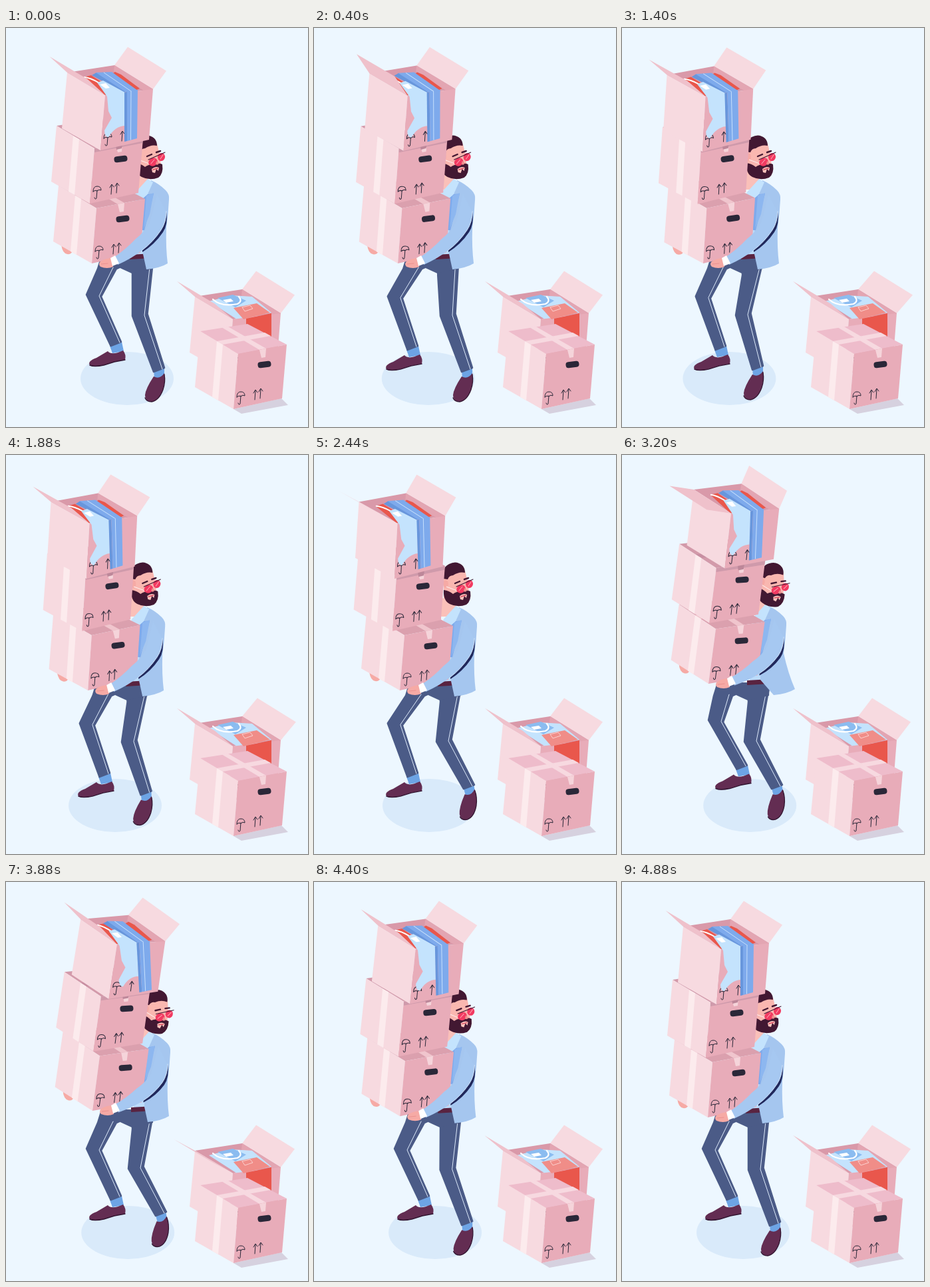
These frames come from a looping animation (454 by 600 pixels, 4.92 s). An HTML page with a canvas:

```html
<!DOCTYPE html>
<html lang="en">
<head>
<meta charset="utf-8">
<title>Carrying boxes</title>
<style>
html, body { margin: 0; width: 100%; height: 100%; overflow: hidden; background: #edf7ff; }
canvas { display: block; width: 454px; height: 600px; }
</style>
</head>
<body>
<canvas id="stage"></canvas>
<script>
const LOOP = 4920;
const canvas = document.getElementById('stage');
const ctx = canvas.getContext('2d');
const dpr = window.devicePixelRatio || 1;
canvas.width = 454 * dpr;
canvas.height = 600 * dpr;

const C = {
  light: '#f7dae0', front: '#e8acb9', inside: '#d999a9', flap: '#efc1cb', tape: '#fcebed',
  ink: '#2a2738', pants: '#4b5b87', jacket: '#a5c6ef', sleeve: '#a6c8f1', navy: '#20285c',
  shirt: '#c4e3fd', deepBlue: '#6896dc', blue: '#7eaaec', red: '#e9574c', skin: '#f6aaa5',
  hair: '#421832', shoe: '#632d52', sole: '#321530', sock: '#6da4e5', seam: '#dce9fa', white: '#ffffff'
};

// Eased 0 to 1 between two times, and a rise followed by a fall.
function ramp(t, from, to) {
  const u = Math.min(1, Math.max(0, (t - from) / (to - from)));
  return u * u * (3 - 2 * u);
}
const pulse = (t, a, b, c, d) => ramp(t, a, b) - ramp(t, c, d);

function poseAt(t) {
  const lean = pulse(t, 0, 900, 1700, 2400);
  const sway = pulse(t, 0, 1000, 2700, 3200);
  const lift = pulse(t, 2800, 3200, 3880, 4600);
  const tilt = pulse(t, 3200, 3850, 3900, 4700);
  const toppling = pulse(t, 2000, 3150, 3200, 3850);
  const outward = ramp(t, 0, 400), inward = ramp(t, 2840, 3200), settle = ramp(t, 3440, 3880);
  const back = ramp(t, 600, 1240), wide = ramp(t, 1720, 2240), home = ramp(t, 3960, 4480);

  const low = { x: lift - 7 * lean, y: -10 * lift, turn: .048 * lift - .02 * lean };
  const top = {
    x: 12.5 * lift - 21 * sway,
    y: 2 * sway - 13.5 * lift + 5.5 * tilt,
    turn: .03 * (lift - sway) + .035 * tilt
  };
  const mid = {};
  for (const k in low) mid[k] = low[k] + .38 * (top[k] - low[k]);

  const leftStep = 32 * inward - 17 * outward - 15 * settle;
  const rightStep = 29 * wide - 26 * back - 3 * home;
  return {
    low, mid, top,
    torso: { x: 2 * lift - 7 * lean, y: -2 * lift, turn: 0 },
    head: { x: 12 * lift - 8 * lean, y: lift, turn: .2 * lift },
    tail: 15 * pulse(t, 2900, 3200, 3300, 3800),
    hip: -9 * lean,
    left: { x: leftStep, y: -.36 * leftStep, kneeX: .6 * leftStep, kneeY: -.15 * leftStep },
    right: {
      x: rightStep, y: 15 * home - 3 * back - 12 * wide, turn: .18 * (home - wide),
      kneeX: 13 * wide - 19 * back + 6 * home, kneeY: 2 * home - back - wide
    },
    shadow: .6 * leftStep + .4 * rightStep,
    topFlaps: { angle: .78 + .25 * pulse(t, 0, 400, 450, 1400) - .65 * toppling, lean: 20 - 9 * toppling },
    floorFlaps: { angle: .75 - .22 * pulse(t, 3300, 3880, 3900, 4500), lean: 21 + 3 * pulse(t, 400, 1300, 1500, 2400) },
    swing: .12 * tilt
  };
}

function trace(pts) {
  ctx.beginPath();
  pts.forEach(([x, y]) => ctx.lineTo(x, y));
}
function poly(color, ...pts) {
  trace(pts);
  ctx.closePath();
  ctx.fillStyle = color;
  ctx.fill();
}
function line(color, width, ...pts) {
  trace(pts);
  ctx.strokeStyle = color;
  ctx.lineWidth = width;
  ctx.stroke();
}
function shape(color, path) {
  ctx.fillStyle = color;
  ctx.fill(new Path2D(path));
}
function curve(color, width, path) {
  ctx.strokeStyle = color;
  ctx.lineWidth = width;
  ctx.stroke(new Path2D(path));
}
function oval(color, x, y, rx, ry, turn = 0) {
  ctx.beginPath();
  ctx.ellipse(x, y, rx, ry, turn, 0, 7);
  ctx.fillStyle = color;
  ctx.fill();
}
function placed(x, y, pose, draw) {
  ctx.save();
  ctx.translate(x + pose.x, y + pose.y);
  ctx.rotate(pose.turn || 0);
  draw();
  ctx.restore();
}
const STILL = { x: 0, y: 0 };
const add = (p, q) => [p[0] + q[0], p[1] + q[1]];

// Box corners, measured from the lower end of the front seam.
const LT = [-50, -117], ST = [7, -83], RT = [80, -97], BT = [21, -128], LB = [-58, -33], RB = [73, -16], O = [0, 0];
const OPEN_RT = [79, -92];

function arrow(x, y) {
  curve(C.ink, 1, `M${x},${y}l1,-14m-3,4l3,-5l3,4`);
}
function sides(right) {
  poly(C.light, LT, ST, O, LB);
  poly(C.front, ST, right, RB, O);
  curve(C.ink, 1, 'M5,-18Q5,-26 11,-26Q17,-26 17,-20Q14,-22 11,-19Q8,-21 5,-18M11,-20L10,-8Q8,-5 7,-9');
  arrow(32, -14);
}
function closedBox(lid, lidTape) {
  poly(lid, LT, BT, RT, ST);
  poly(lidTape, [-25, -102], [47, -115], [56, -110], [-16, -97]);
  poly(lidTape, [-18, -123], [-10, -125], [49, -91], [39, -89]);
  sides(RT);
  arrow(40, -16);
  poly(C.tape, [-25, -102], [-16, -97], [-23, -13], [-32, -18]);
  poly('#f5d4da', [39, -89], [49, -91], [48, -78], [42, -77]);
  placed(46.5, -67, { x: 0, y: 0, turn: -.12 }, () => {
    ctx.beginPath();
    ctx.roundRect(-10, -4.5, 20, 9, 4);
    ctx.fillStyle = C.ink;
    ctx.fill();
  });
}
function openBox({ angle, lean }, stuff, drape) {
  const leftFold = [-37 * Math.cos(angle), -34 * Math.sin(angle)], rightFold = [lean, -27.5];
  poly(C.light, BT, add(BT, rightFold), add(OPEN_RT, rightFold), OPEN_RT);
  poly(C.inside, LT, BT, OPEN_RT, ST);
  poly('#e3a5b2', BT, OPEN_RT, [74, -84], [20, -119]);
  stuff();
  sides(OPEN_RT);
  poly(C.flap, LT, add(LT, leftFold), add(ST, leftFold), ST);
  drape();
}

function packedClothes() {
  poly(C.red, [-25, -110], [-14, -113], [23, -89], [6, -83]);
  poly(C.red, [22, -118], [31, -114], [59, -93], [52, -90], [16, -114]);
  curve(C.white, 2, 'M-24,-110Q-15,-109 -3,-102');
}
function hangingClothes(swing) {
  ctx.save();
  ctx.translate(-142, -184);
  ctx.transform(1, 0, swing, 1, -swing * 95, 0);
  poly(C.deepBlue, [129, 71], [136, 67], [181, 94], [178, 98]);
  poly(C.blue, [135, 67], [159, 66], [198, 94], [181, 97]);
  line('#c7e0fc', 1, [147, 67], [188, 95]);
  shape(C.shirt, 'M137,82L146,79L179,97L178,147Q164,148 154,164Q148,164 148,154L159,135L154,125L152,103Z');
  poly(C.white, [141, 85], [150, 83], [156, 90], [150, 91]);
  poly(C.deepBlue, [178, 97], [182, 96], [182, 170], [178, 171]);
  poly(C.blue, [182, 96], [198, 93], [197, 166], [182, 170]);
  line('#c7e0fc', 1, [188, 95], [187.5, 168]);
  ctx.restore();
}
function floorClothes() {
  poly(C.shirt, [-29, -110], [5, -119], [36, -117], [65, -93], [13, -83]);
  poly('#8bbcf0', [-16, -115], [7, -120], [27, -111], [11, -101]);
  poly(C.white, [-8, -112], [4, -114], [8, -110], [-3, -108]);
  curve(C.white, 2.2, 'M-23,-113Q-10,-101 14,-106Q22,-110 16,-117');
}
function floorDrape() {
  poly('#f08d88', [8, -100], [43, -107], [63, -93], [23, -83]);
  line('#fbd0ce', 1, [21, -101], [33, -104], [37, -99], [25, -95], [21, -101]);
  poly(C.red, [27, -84], [65, -92], [65, -55], [27, -61]);
}
function floorBoxes(pose) {
  poly('#d6d1df', [342, 573], [354, 580], [424, 567], [414, 557]);
  placed(334, 521, STILL, () => openBox(pose.floorFlaps, floorClothes, floorDrape));
  placed(342, 573, STILL, () => closedBox('#eebccb', '#f7d9e0'));
}

function limb(...pts) {
  poly(C.pants, ...pts);
  line(C.pants, 2.5, ...pts, pts[0]);
}
function rightLeg({ right, hip }) {
  const knee = (x, y) => [x + right.kneeX, y + right.kneeY], ankle = (x, y) => [x + right.x, y + right.y];
  placed(230, 516, right, () => {
    poly(C.sock, [-8, -3], [8, -5], [8, 9], [-7, 11]);
    shape(C.shoe, 'M-8,8Q1,13 8,3Q10,14 6,28Q0,44 -11,46Q-21,46 -21,36Q-20,26 -8,8Z');
    curve(C.sole, 1.3, 'M8,5Q10,16 6,28Q0,44 -11,46Q-19,46 -21,40');
  });
  limb([190 + hip, 350], [190 + hip, 372], knee(190, 433), ankle(222, 517), ankle(238, 511), knee(212.5, 430), [221 + hip, 350]);
  line(C.seam, 1, [216 + hip, 360], knee(208, 432), ankle(235, 513));
}
function leftLeg({ left, hip }) {
  const knee = (x, y) => [x + left.kneeX, y + left.kneeY], ankle = (x, y) => [x + left.x, y + left.y];
  placed(0, 0, left, () => {
    poly(C.sock, [156, 478], [174, 472], [177, 486], [160, 489]);
    shape(C.shoe, 'M153,486Q159,493 176,485Q181,491 179,499L163,502L147,507Q132,511 126,507Q122,501 136,496Z');
    curve(C.sole, 1.5, 'M126,507Q132,510 147,507L163,502L179,499');
  });
  limb([143 + hip, 346], [138 + hip, 362], knee(121, 401), ankle(157.5, 478), ankle(173, 472), knee(143, 404), [166 + hip, 362], [188 + hip, 352]);
  line(C.seam, 1, [161 + hip, 360], knee(140, 403), ankle(171, 473));
}

function body(pose) {
  const { hip, tail } = pose;
  rightLeg(pose);
  leftLeg(pose);
  poly(C.pants, [142 + hip, 342], [222 + hip, 342], [221 + hip, 362], [189 + hip, 369], [165 + hip, 358]);
  placed(0, 0, pose.torso, () => {
    poly('#bcdcfb', [196, 245], [225, 245], [220, 342], [190, 342]);
    poly('#592340', [186, 341], [220, 339], [219, 346], [186, 348]);
    shape(C.jacket, `M205,255L218,229Q230,234 240,244Q246,250 245,258Q244,280 241,300
      Q${240 + tail / 2},330 ${243 + tail},354 Q${232 + tail},361 ${211 + tail},363 L206,340Q207,300 205,255Z`);
    poly('#fac0b9', [190, 214], [213, 222], [214, 232], [203, 243], [190, 243]);
    poly(C.shirt, [194, 248], [213, 227], [221, 232], [212, 252], [203, 262]);
    poly(C.blue, [204, 258], [213, 250], [222, 249], [208, 304], [204, 304]);
    poly('#8db7f0', [211, 252], [222, 248], [216, 280], [207, 302]);
  });
}

function head(pose) {
  placed(216, 195, pose, () => {
    ctx.translate(-216, -195);
    shape('#f9b7b0', 'M195,178L227,174Q231,188 233,206L222,216L195,216Z');
    shape(C.hair, 'M194,186Q191,170 203,164Q214,158 223,166Q227,170 227,177Q218,175 209,181Q203,181 201,187Z');
    oval(C.skin, 198, 194, 4, 6);
    shape(C.hair, 'M195,203Q203,204 209,209Q215,204 222,206Q229,202 235,205Q237,219 229,225Q216,230 204,224Q194,219 195,203Z');
    shape('#fbc6bf', 'M219,212Q225,207 230,210L229,215L226,212L224,218L220,217Z');
    line('#d94b60', 1.5, [221, 213], [228, 211]);
    line(C.hair, 2.4, [212, 193], [219, 190]);
    line(C.hair, 2.4, [226, 187], [232, 185]);
    line('#fff1f1', 1, [199, 198], [215, 204]);
    oval('#f23a61', 221, 201.5, 7, 6, -.5);
    oval('#f23a61', 233.5, 194, 5.5, 6, .2);
    line(C.hair, 1.1, [214, 198], [239, 187]);
    line('#ff9fb0', 1.1, [218, 204], [223, 198]);
    line('#ff9fb0', 1.1, [232, 197], [236, 191]);
    shape('#ef8d8d', 'M226,200L230,203Q229,207 225,205Z');
  });
}

function arm({ torso, low }) {
  // The sleeve follows the torso at the shoulder and the box at the wrist.
  const p = (x, y) => {
    const w = Math.min(1, Math.max(0, (236 - x) / 72));
    return `${x + torso.x + (low.x - torso.x) * w},${y + torso.y + (low.y - torso.y) * w}`;
  };
  const edge = d => `M${p(241, 276)}Q${p(241 + d, 292 + d)} ${p(233 + d, 304 + d)}Q${p(221 + d, 322 + d)} ${p(205, 334 + d)}`;
  shape(C.navy, edge(3) + `L${p(205, 325)}Z`);
  shape(C.sleeve, `M${p(227, 250)}${edge(0).replace('M', 'L')}Q${p(190, 346)} ${p(168, 356)}L${p(162, 345)}
    Q${p(180, 333)} ${p(195, 317)}Q${p(208, 307)} ${p(216, 293)}Z`);
  curve('#d8eafd', .9, edge(0));
  placed(0, 0, { x: low.x, y: low.y }, () => {
    shape(C.skin, 'M160,346Q150,346 142,351Q138,355 142,359Q152,363 161,359Z');
    line('#e98f8e', .9, [143, 355], [153, 354]);
    poly(C.white, [157, 346], [164, 342], [170, 354], [160, 358]);
  });
}

function stack({ low, mid, top, topFlaps, swing }) {
  placed(129, 354, low, () => {
    shape(C.skin, 'M-46,-28L-29,-20Q-30,-13 -37,-14Q-44,-15 -46,-28Z');
    closedBox('#dba0ae', '#f0c5cd');
  });
  placed(126, 264, mid, () => {
    closedBox('#d39aaa', '#c88fa2');
    poly('#cf9aab', ST, RT, [79, -91], [7, -77]);
    poly('#bd8799', [39, -89], [49, -91], [48, -83], [40, -81]);
  });
  placed(142, 184, top, () => openBox(topFlaps, packedClothes, () => hangingClothes(swing)));
}

function draw(t) {
  const pose = poseAt(t);
  ctx.setTransform(dpr, 0, 0, dpr, 0, 0);
  ctx.lineCap = ctx.lineJoin = 'round';
  ctx.fillStyle = '#edf7ff';
  ctx.fillRect(0, 0, 454, 600);
  oval('#d9eafa', 182 + pose.shadow, 527, 70, 40);
  floorBoxes(pose);
  body(pose);
  head(pose.head);
  stack(pose);
  arm(pose);
}

const start = performance.now();
function frame() {
  draw((performance.now() - start) % LOOP);
  requestAnimationFrame(frame);
}
frame();
</script>
</body>
</html>
```
